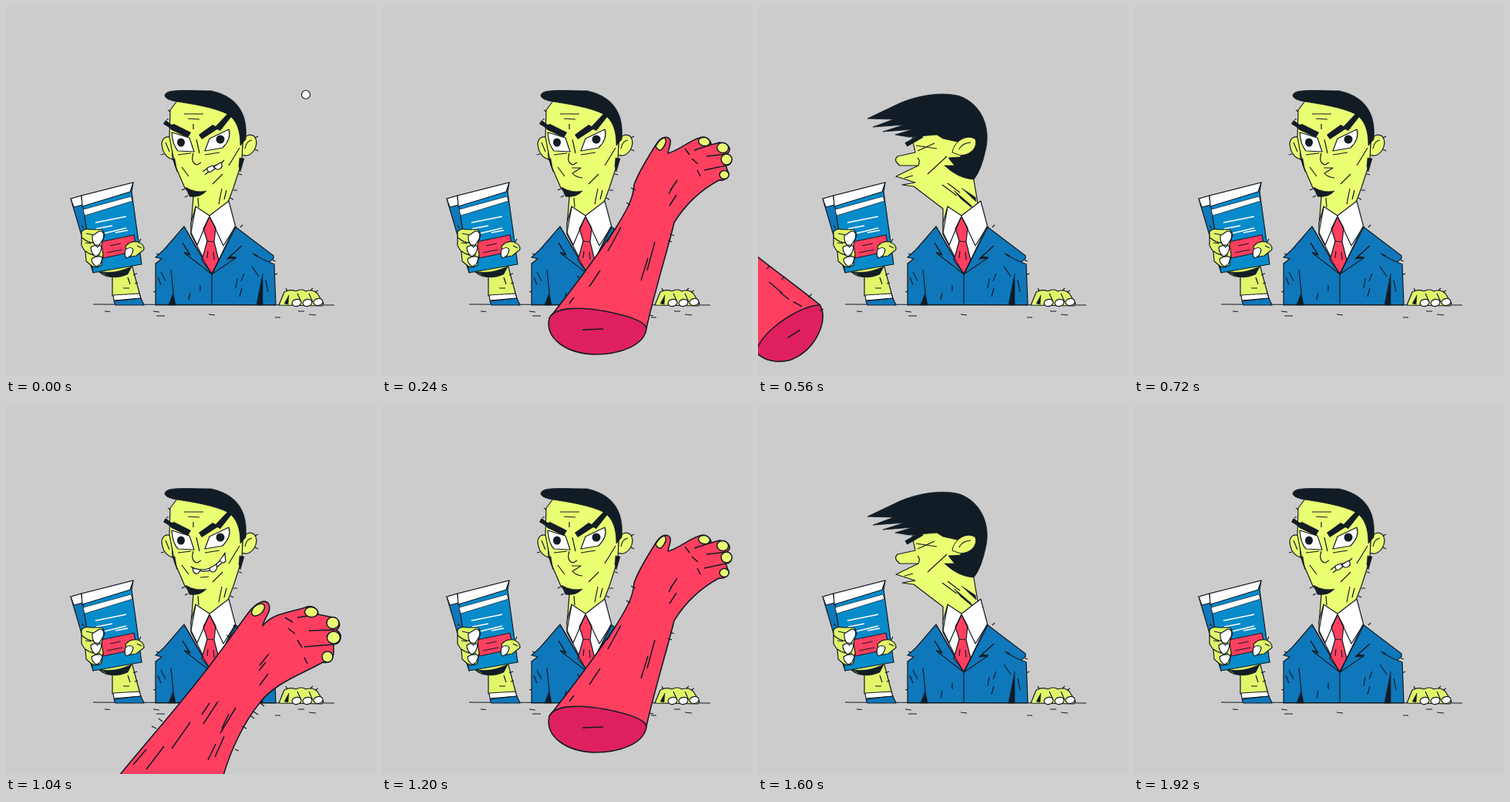
Animation, 480 px wide and 480 px high, one loop 2000 ms. Source, as an HTML page with a canvas:

```html
<!DOCTYPE html>
<html lang="en">
<head>
<meta charset="utf-8">
<title>Slap</title>
<style>
html, body { margin: 0; width: 100%; height: 100%; overflow: hidden; background: #ccc; }
canvas { display: block; width: 480px; height: 480px; }
</style>
</head>
<body>
<canvas id="stage" width="480" height="480"></canvas>
<script>
const ctx = document.getElementById('stage').getContext('2d');
const INK = '#121c25', SKIN = '#ebff73', HAND = '#e2f56b', BLUE = '#0f78bb',
      BOOK = '#078bcb', RED = '#ff3f60', CUT = '#df205f', WHITE = '#fff';

function shape(d, fill, width = 1.2, color = INK) {
  const path = new Path2D(d);
  if (fill) { ctx.fillStyle = fill; ctx.fill(path); }
  if (width) { ctx.lineWidth = width; ctx.strokeStyle = color; ctx.stroke(path); }
}
const line = (d, width, color) => shape(d, null, width, color);

function oval(x, y, rx, ry, fill, turn = 0, width = 1.2) {
  ctx.beginPath();
  ctx.ellipse(x, y, rx, ry, turn, 0, 7);
  ctx.fillStyle = fill;
  ctx.fill();
  if (width) { ctx.lineWidth = width; ctx.strokeStyle = INK; ctx.stroke(); }
}

function placed(draw, dx, dy, turn = 0, px = 0, py = 0) {
  ctx.save();
  ctx.translate(px + dx, py + dy);
  ctx.rotate(turn);
  ctx.translate(-px, -py);
  draw();
  ctx.restore();
}

function desk() {
  line('M113 387L426 388M128 396l7 .5M191 396l8 1M195 402l11 0M263 400l8 1M349 404l7 0M379 396l8 0M393 400l9 1');
}

function body() {
  shape('M231 286L205 316L194 326L202 328L194 334V388H350L348 335L341 332L347 328V324L297 286L267 348Z', BLUE);
  shape('M246 260L240 282V296L267 348L298 287L289 253L264 272Z', WHITE);
  shape('M264 273L256 289L261 305L254 330L267 347L276 330L270 306L272 288Z', RED);
  line('M261 305L270 306M246 261L240 294L248 310L264 273L282 311L297 287M262 318l-1 9M269 319l1 10');
  line('M231 286L267 348L297 286M229 307L239 323L231 320L267 348L298 327L287 328L306 311');
  shape('M229 307L239 323L231 320L237 321Z M306 311L287 328L299 326L291 325Z', INK, .8);
  shape('M217 372L211 388H220Z M333 347L325 388H333Z', INK, .6);
  line('M267 348V388M217 372L214 342M201 345l6 12M197 352l4 10M239 372l-2 9M252 362v8M300 354l-2 12M309 347l-4 10M306 366l-3 11M320 321l7 3M319 338l9 13M337 356l3 15M322 323l18 9M195 370l-4 1M348 349l4 -2M346 330l4 1M304 287l3 -3M199 323l-4 -2');
}

function restHand() {
  shape('M354 388L361 371Q369 367 376 370Q383 366 389 370Q398 367 404 373L412 386L410 389Z', HAND);
  line('M383 384l-5 -11M398 384l-5 -11M365 370l-2 -4M395 369l3 -3M401 371l4 -2');
  shape('M361 386l6 -11l-1 12z', INK, .5);
  for (const [x, y] of [[377, 385], [391, 385], [405, 384]]) oval(x, y, 6, 4.5, WHITE, -.2);
}

function book() {
  shape('M116 340Q128 353 138 351V376H174L163 335Z', HAND);
  shape('M121 344Q139 349 163 338L158 348Q140 356 128 348Z', INK, .6);
  line('M158 352l3 9M152 366l8 0M165 349l5 -2M167 360l4 -1');
  shape('M139 375L173 373L175 379L140 382Z', WHITE);
  shape('M140 383L175 379L179 388H142Z', BLUE);
  shape('M84 250L98 246L113 346L104 318Z', BLUE);
  shape('M84 250L98 246L99 258L88 261Z', WHITE);
  shape('M98 246L165 229L163 241L176 335L113 346Z', BOOK);
  shape('M98 246L165 229L161 241L99 260Z', WHITE);
  shape('M100 264L162 247L164 253L102 272Z', WHITE, .7);
  line('M116 281L156 273M117 289L138 285M119 297L156 288M142 294L158 291', 1.4, WHITE);
  shape('M123 306L166 297L170 318L126 327Z', RED);
  line('M135 311l14 -3M131 320l20 -4');
  shape('M98 293Q102 288 110 290L124 290Q130 295 126 303L124 310L126 322L124 336Q118 341 111 337L104 331L103 319L98 311Z', HAND);
  line('M98 300Q109 310 121 307M103 318Q112 325 122 323M104 295l9 2M103 307l7 1M101 288l-3 -3');
  shape('M112 298L121 292Q129 292 126 302L119 313Q111 308 112 298Z M110 313Q117 308 124 312Q123 323 116 325Q110 320 110 313Z M111 328Q118 323 125 326Q124 336 117 338Q111 334 111 328Z', WHITE);
  shape('M155 312Q161 304 171 306Q180 310 179 316L169 324L157 326Z', HAND);
  shape('M155 316Q162 311 165 316Q164 325 156 327Q153 322 155 316Z', WHITE);
  line('M170 311l6 3M173 306l2 -4');
}

const mouths = {
  frown() {
    line('M246 210L258 210L247 217Q251 222 260 223');
  },
  smirk() {
    line('M250 215Q264 218 276 206L279 201M252 222l7 1');
  },
  smile() {
    line('M244 214Q262 221 277 207L281 198');
  },
  grin() {
    shape('M240 211Q262 225 280 206L284 193L279 202L268 212Q252 218 240 211Z', WHITE);
    shape('M242 213Q243 221 248 220Q252 218 252 215Z M264 213Q265 220 271 217Q275 213 273 208Z M277 203Q281 208 285 204L284 194Z', WHITE);
    line('M252 225l11 -1');
  },
  sneer() {
    line('M255 215L262 210L279 204L283 200M258 219L264 214');
    shape('M261 210Q261 217 266 215L271 211L268 207Z M270 208Q272 214 278 211Q282 208 279 203Z', WHITE);
  }
};

function head(mouth) {
  shape('M215 171Q204 167 202 178Q203 195 216 199Z', SKIN);
  shape('M307 176Q313 163 322 169Q328 176 322 187Q315 197 306 193Z', SKIN);
  shape('M222 123L213 135L212 170L219 206L232 236L243 248L240 285H290L287 257L295 236L306 202L308 150L285 128Z', SKIN);
  shape('M206 116C207 107 235 110 266 110C298 117 314 137 311 173L304 181C304 160 299 149 289 141C270 131 240 127 222 124C214 123 206 120 206 116Z', INK, .8);
  shape('M216 198L219 198L222 215Z M303 197L309 198L304 215L302 208Z', INK, .6);
  shape('M233 235Q246 243 260 240Q252 249 238 247Z', INK, .6);
  shape('M215 164L238 171L244 189L223 188Q216 180 215 164Z', WHITE);
  shape('M258 188L264 172L289 160Q293 172 281 184Z', WHITE);
  oval(227, 177, 5, 5.5, INK, 0, 0);
  oval(278, 173, 5.5, 5.5, INK, 0, 0);
  shape('M207 148L215 154L218 153L240 164L236 171L215 161L212 158L204 153Z', INK, 0);
  shape('M250 167L268 154L272 156L288 139L293 143L278 162L274 160L254 173Z', INK, 0);
  line('M231 140L256 140M236 146L251 147M243 153L243 160M247 173L251 191M243 191Q239 204 248 206L253 203M223 193L240 191M258 193L277 190M303 184L289 207M228 209l9 12M268 231l13 -13M249 249l1 12M280 237l-4 20M286 239l-3 12M207 177l5 12M319 174q-7 1 -9 11');
  line('M213 137l-3 -2M211 147l-3 0M205 192l-4 1M232 237l-4 2M236 246l-4 2M323 171l4 -2M323 186l4 2M295 239l5 0M291 249l4 2M302 218l4 1');
  mouths[mouth]();
}

function slappedHead() {
  shape('M200 171L204 190L181 195Q175 200 184 207L208 207L179 221L204 229L187 232L202 234L240 263V285H290L279 220L282 160L240 150Z', SKIN);
  shape('M142 146L184 126C210 115 240 111 262 117C291 128 301 158 296 183Q290 213 280 225Q260 224 242 207L255 207L247 197L262 196L270 185L258 176L240 172L232 167L196 170L178 167L201 160L162 163L190 154L149 157L176 147Z', INK, .8);
  shape('M252 190C254 175 272 165 282 173C286 185 272 196 260 193Z', SKIN, 1);
  line('M261 186Q264 178 276 177M205 181L232 185M207 188L229 178M208 207Q211 200 207 197M220 218L245 195M190 223L201 220M239 232L258 246M246 230L262 242');
  line('M192 180L213 168', 6);
  shape('M254 239L276 258L279 263L263 250Z M264 236L282 248L283 254Z', INK, .5);
}

const nails = (list) => list.forEach(([x, y, rx, ry, turn]) => oval(x, y, rx, ry, SKIN, turn, 1.5));

function raisedHand() {
  shape('M217 405C245 370 280 322 302 290C318 264 326 250 327 232C333 215 347 193 356 179C362 169 371 168 374 174C375 181 371 186 371 191C386 187 398 175 412 171C420 168 427 174 427 180L438 177C452 178 454 188 447 192C456 196 455 207 446 207L448 213C453 222 445 227 437 226C415 238 395 255 379 281C371 315 355 365 343 418Z', RED, 1.6);
  shape('M217 405C224 390 258 390 290 396C320 402 343 410 343 419C340 440 310 452 276 452C240 451 211 432 217 405Z', CUT, 1.6);
  line('M260 420L287 419M427 180L405 187M447 192L421 195M446 207L418 213M393 185l6 8M402 198l8 7M409 213l4 8M383 226l-9 13M377 235l-5 9M382 245l-9 14M310 287l-17 31M302 289l-10 17M354 306l-10 37M345 327l-9 29M283 343l-14 21M249 378l-6 8', 1.5);
  line('M329 239l-6 -3M322 258l-5 -3M374 296l5 2M371 304l5 2M346 401l6 1M257 354l-4 -4', 1.2);
  shape('M355 182Q361 171 367 171Q371 178 362 187Q357 187 355 182Z', SKIN, 1.5);
  nails([[418, 176, 7.5, 5.5, .2], [442, 184, 7.5, 6.5, .1], [447, 199, 7, 7, 0], [444, 219, 6, 5.5, 0]]);
}

function risingHand() {
  shape('M147 482C185 435 235 380 275 325C288 308 300 290 315 270C325 257 337 252 341 260C345 269 334 279 333 288C345 272 365 271 388 264C398 260 405 266 405 273L420 276C434 277 436 290 428 293C438 298 435 311 425 312L425 321C425 333 418 337 411 335C385 350 348 362 329 388C309 412 291 450 282 482Z', RED, 1.6);
  line('M405 273L378 277M427 293L393 294M424 312L387 315M362 277l10 6M366 291l9 7M378 306l6 10M387 329l4 8M341 324l-12 15M337 335l-9 11M340 350l-11 15M275 386l-19 29M264 388l-10 15M298 394l-20 33M289 402l-9 19M239 413l-24 34M205 444l-23 30M182 448l-17 20M283 431l-12 27M272 441l-10 21', 1.5);
  line('M300 291l-5 -4M291 303l-5 -3M330 388l5 4M321 399l6 4M317 404l5 4M306 418l6 3M203 412l-5 -4M195 421l-6 -3M297 448l5 2');
  nails([[327, 267, 6, 10, .85], [396, 270, 8.5, 6.5, .1], [424, 284, 8, 7.5, 0], [425, 303, 8.5, 8, 0], [417, 328, 7, 7, 0]]);
}

function slapHand() {
  shape('M85 167C92 165 104 168 113 168C127 171 140 176 147 182C160 203 180 227 190 252C215 302 245 350 268 393L169 420C165 380 150 320 138 276C128 277 120 273 114 268C101 276 92 287 82 297C76 302 69 300 71 290C78 275 88 258 101 243L100 236C84 243 72 250 64 258C58 264 50 262 52 252C58 240 80 224 93 216C78 218 60 224 48 232C42 236 36 232 40 222C48 209 75 198 93 191C87 185 82 175 85 167Z', RED, 1.6);
  shape('M168 417C185 395 240 384 268 393C272 414 242 445 205 444C188 442 172 431 168 417Z', CUT, 1.6);
  line('M213 416L232 413M93 191Q110 200 127 197M93 208Q92 232 114 268M127 207Q120 232 146 247M114 268Q123 276 144 277M181 257l9 17M191 263l9 17M187 287l14 26M164 317l4 24M219 340l10 20M227 358l7 13M171 356l4 21M238 376l8 10', 1.5);
  line('M113 167l-3 8M180 233l5 -3M191 252l5 -2M223 323l5 -2M235 344l5 -3M258 378l6 -2M151 315l-5 2M160 354l-5 1M265 400l5 0');
  shape('M87 167L105 168Q104 177 97 178Q89 177 87 167Z', SKIN, 1.5);
}

function impact(reach) {
  const rays = [[186, 59, 184, 106], [95, 96, 122, 130], [297, 100, 252, 141], [314, 243, 271, 229]];
  for (const [x, y, a, b] of rays)
    line(`M${x} ${y}L${x + (a - x) * reach} ${y + (b - y) * reach}`, 10, WHITE);
}

const hands = {
  rise: risingHand,
  near: () => placed(raisedHand, -5, 14),
  top: raisedHand,
  swing: () => placed(slapHand, 60, -4, .36, 219, 416),
  hit: slapHand,
  follow: () => placed(slapHand, -75, 6, -.2, 219, 416),
  leave: () => placed(slapHand, -175, 12, -.4, 219, 416)
};

// One [mouth, hand] pair per 80 ms beat; the mouth "hit" is the turned head.
const slap = [['frown', 'near'], ['frown', 'top'], ['frown', 'swing'],
  ['hit', 'hit'], ['hit', 'follow'], ['hit', 'leave'], ['hit'], ['frown']];
const beats = [['sneer'], ['sneer', 'rise'], ...slap,
  ['smirk'], ['smile'], ['grin'], ['grin', 'rise'], ...slap,
  ['smirk'], ['smile'], ['sneer']];

function draw(time) {
  const beat = Math.floor(time % 2000 / 80);
  const [mouth, hand] = beats[beat];
  ctx.fillStyle = '#ccc';
  ctx.fillRect(0, 0, 480, 480);
  ctx.lineJoin = 'round';
  if (mouth === 'hit') slappedHead(); else head(mouth);
  body();
  desk();
  book();
  restHand();
  if (beat === 0) oval(389, 115, 5.5, 5.5, WHITE);
  if (hand) hands[hand]();
  if (hand === 'hit') impact(1);
  if (hand === 'follow') impact(.45);
}

const start = performance.now();
function tick() {
  draw(performance.now() - start);
  requestAnimationFrame(tick);
}
tick();
</script>
</body>
</html>
```
